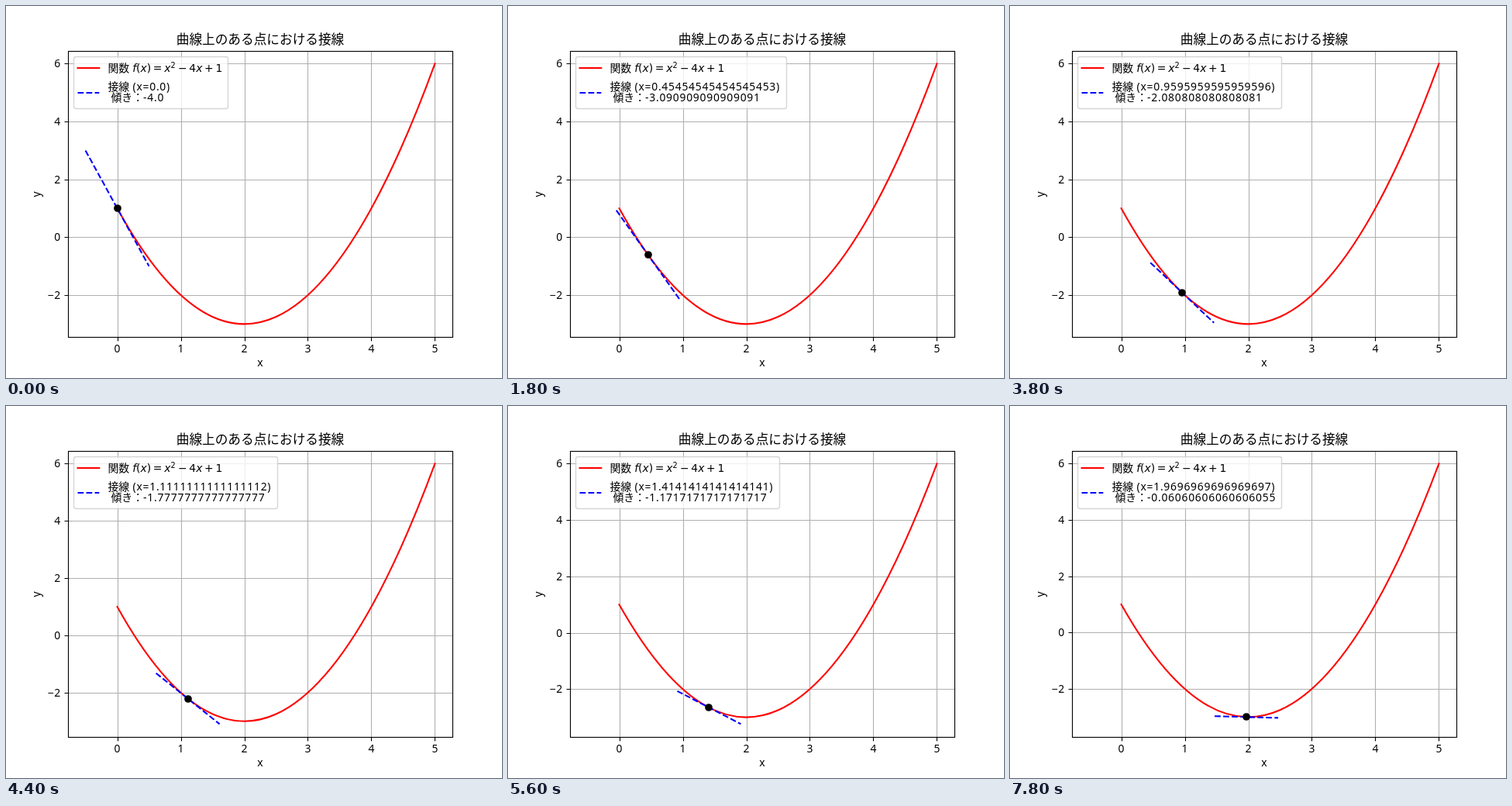
Write an HTML page that moves like this. It is 640 by 480 pixels and loops after 8 s.

```html
<!DOCTYPE html>
<html lang="ja">
<head>
<meta charset="utf-8">
<title>接線</title>
<style>
  html, body { margin: 0; width: 100%; height: 100%; overflow: hidden; background: #fff; }
  svg { display: block; width: 640px; height: 480px; }
  text { font: 13.89px "Noto Sans CJK JP", "Noto Sans CJK", sans-serif; white-space: pre; }
  .latin { font-family: "Noto Sans", sans-serif; letter-spacing: .75px; }
  .math { font-family: "DejaVu Sans", sans-serif; }
  .math .var { font-style: italic; }
  .title { font-size: 16.67px; }
  .mid { text-anchor: middle; }
  .end { text-anchor: end; }
  path, rect { fill: none; stroke-width: 1.11; }
  .grid { stroke: #b0b0b0; }
  .axis { stroke: #000; }
  .curve, .tangent { stroke-width: 2.083; stroke: #f00; stroke-linecap: square; }
  .tangent { stroke: #00f; stroke-linecap: butt; stroke-dasharray: 7.71 3.33; }
  .legend { fill: #fff; stroke: #ccc; stroke-width: 1.39; opacity: .8; }
</style>
</head>
<body>
<svg viewBox="0 0 640 480">
  <path class="grid" id="grid"/>
  <path class="axis" id="ticks"/>
  <path class="curve" id="curve"/>
  <path class="tangent" id="tangent"/>
  <circle id="dot" r="4.86"/>
  <rect class="axis" x="80.5" y="58.5" width="496" height="369"/>
  <g id="labels"></g>
  <text class="title mid" x="328" y="48.5">曲線上のある点における接線</text>
  <text class="latin mid" x="328.4" y="465">x</text>
  <text class="latin mid" transform="translate(43.5 242.5) rotate(-90)">y</text>

  <rect class="legend" id="box" x="87.5" y="65.5" height="67" rx="2.78"/>
  <path class="curve" d="M92.5 80H120.3"/>
  <path class="tangent" d="M92.5 112H120.3"/>
  <text x="131.4" y="85">関数</text>
  <text class="math" x="163.2" y="85"><tspan class="var">f</tspan>(<tspan class="var">x</tspan>)<tspan dx="2.7">=</tspan><tspan class="var" dx="2.7">x</tspan><tspan dy="-5.3" font-size="9.72" style="font-size:9.72px">2</tspan><tspan dx="3.4" dy="5.3">−</tspan><tspan dx="2.7">4</tspan><tspan class="var">x</tspan><tspan dx="2.7">+</tspan><tspan dx="2.7">1</tspan></text>
  <text id="point" x="131.4" y="109">接線<tspan class="latin"></tspan></text>
  <text id="slope" x="135.4" y="123">傾き：<tspan class="latin"></tspan></text>
</svg>
<script>
const $ = id => document.getElementById(id);
const STEP_MS = 200, STEPS = 40, DX = 5 / 99;
const TOP = 57.6, HEIGHT = 369.6, MARGIN = HEIGHT * .05 / 1.1;
const xTicks = [0, 1, 2, 3, 4, 5], yTicks = [-2, 0, 2, 4, 6];

const f = x => x * x - 4 * x + 1;
const px = x => 80 + (x + .775) * 496 / 6.05;
const snap = v => Math.floor(v + .5) + .5;
const decimal = v => Number.isInteger(v) ? v.toFixed(1) : String(v);

function addLabel(cls, x, y, value) {
  const label = document.createElementNS('http://www.w3.org/2000/svg', 'text');
  label.setAttribute('class', 'latin ' + cls);
  label.setAttribute('x', x);
  label.setAttribute('y', y);
  label.textContent = String(value).replace('-', '−');
  return $('labels').appendChild(label);
}

xTicks.forEach(v => addLabel('mid', px(v) + .4, 447, v));
const yLabels = yTicks.map(v => addLabel('end', 71, 0, v));

// The lower limit only ever grows, reaching its extreme at step 30.
function yScale(step) {
  const end = Math.min(step, 30) * DX + .5;
  const low = Math.min(-3, (end - 2) ** 2 - 3.25);
  const unit = HEIGHT / 1.1 / (6 - low);
  return y => TOP + MARGIN + (6 - y) * unit;
}

function draw(step) {
  const py = yScale(step);
  const at = (x, y) => `${px(x)} ${py(y)}`;
  const x = step * DX, y = f(x), slope = 2 * x - 4;

  $('grid').setAttribute('d',
    xTicks.map(v => `M${snap(px(v))} 58V427`).join('') +
    yTicks.map(v => `M80 ${snap(py(v))}H576`).join(''));
  $('ticks').setAttribute('d',
    xTicks.map(v => `M${snap(px(v))} 427.5v5`).join('') +
    yTicks.map(v => `M80.5 ${snap(py(v))}h-5`).join(''));
  yLabels.forEach((label, i) => label.setAttribute('y', snap(py(yTicks[i])) + 4.7));

  $('curve').setAttribute('d', `M${at(0, 1)}Q${at(2.5, -9)} ${at(5, 6)}`);
  $('tangent').setAttribute('d', `M${at(x - .5, y - slope / 2)}L${at(x + .5, y + slope / 2)}`);
  $('dot').setAttribute('cx', Math.round(px(x)));
  $('dot').setAttribute('cy', Math.round(py(y)));

  $('point').lastChild.textContent = ` (x=${decimal(x)})`;
  $('slope').lastChild.textContent = decimal(slope);
  const right = Math.max(280.4,
    133.6 + $('point').getComputedTextLength(),
    135.4 + $('slope').getComputedTextLength());
  $('box').setAttribute('width', snap(right + 5.56) - 87.5);
}

let shown = -1;
function tick() {
  const step = Math.floor(performance.now() / STEP_MS) % STEPS;
  if (step !== shown) draw(shown = step);
  requestAnimationFrame(tick);
}
tick();
</script>
</body>
</html>
```
